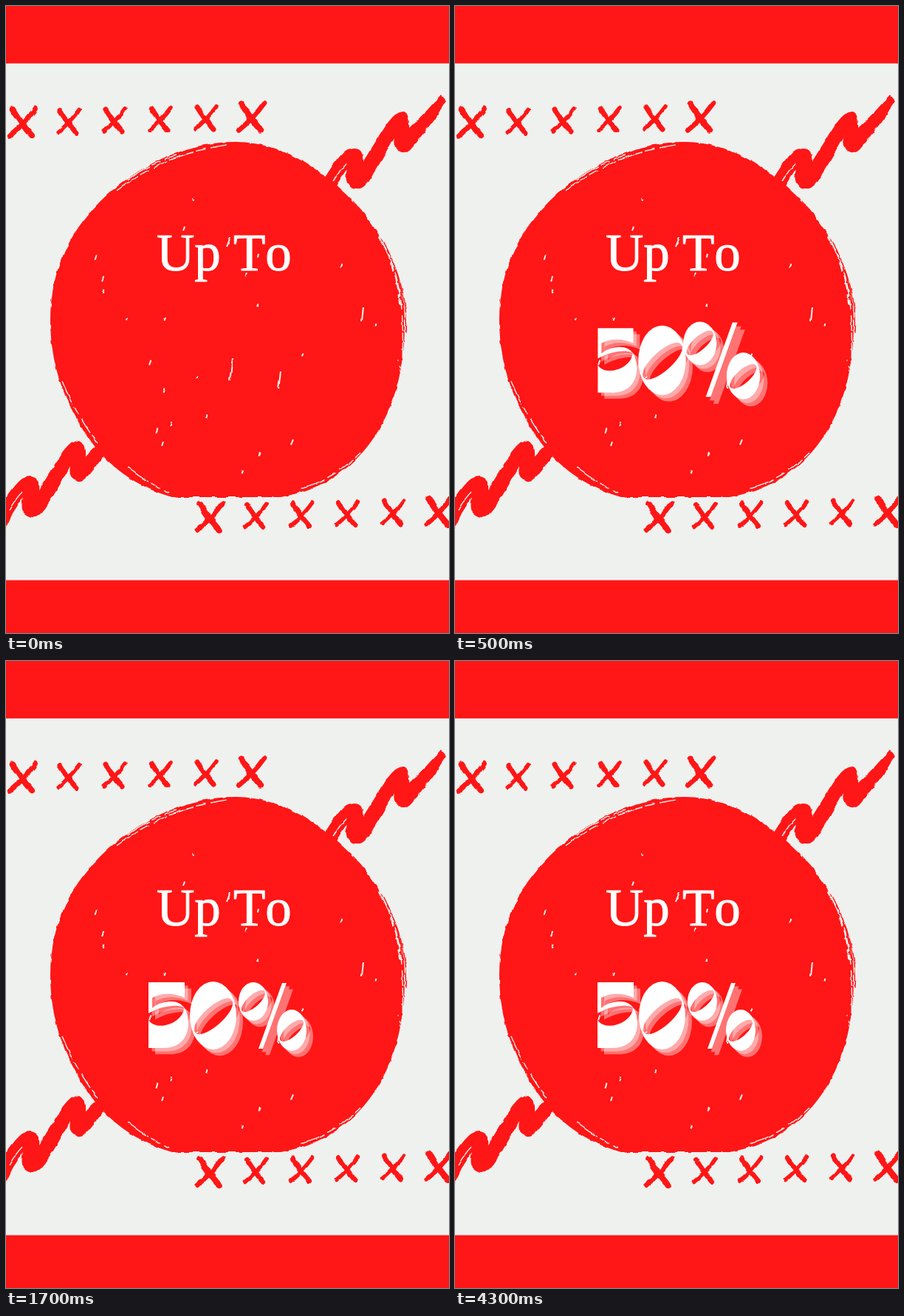
An HTML page that plays this animation: 600 px wide and 849 px high, repeating every 5 s.

```html
<!DOCTYPE html>
<html lang="en">
<head>
<meta charset="utf-8">
<title>Up To 50%</title>
<style>
  html, body { margin: 0; width: 100%; height: 100%; overflow: hidden; background: #eff1ef; }
  svg { display: block; width: 600px; height: 849px; }
  .red { fill: #ff1616; }
  .ink { fill: none; stroke: #ff1616; stroke-linecap: round; }
  .dry { fill: none; stroke: #eff1ef; stroke-width: 1.4; stroke-dasharray: 34 4 13 7 22 3; }
  .title { font: 71px "Liberation Serif", serif; font-kerning: none; stroke: #fff; stroke-width: 1; }
</style>
</head>
<body>
<svg viewBox="0 0 600 849">
  <defs>
    <filter id="rough" filterUnits="userSpaceOnUse" x="-20" y="60" width="640" height="740" color-interpolation-filters="sRGB">
      <feTurbulence type="fractalNoise" baseFrequency=".08" numOctaves="2" seed="4"/>
      <feDisplacementMap in="SourceGraphic" scale="4" xChannelSelector="R" yChannelSelector="G"/>
    </filter>

    <g id="zigzag">
      <path class="red" d="M416 256L432 232Q450 203 461 195Q474 188 482 197Q485 202 484 210
        Q504 178 517 158Q528 143 538 143Q547 147 546 165Q566 147 589 120L597 129
        Q583 152 551 190Q540 204 529 194Q524 190 526 178Q508 212 489 240
        Q479 253 465 243Q458 238 462 220Q455 231 448 242L430 280Z"/>
      <path class="dry" d="M443 238Q452 222 461 213"/>
    </g>
    <g id="cross" class="ink">
      <path stroke-width="7" d="M-11-15Q-2 0 11 15"/>
      <path stroke-width="5.5" d="M15-16Q2 2-14 15"/>
    </g>
    <g id="crosses"></g>

    <path id="five" d="M193 435H242V456C230 450 212 448 198 456V470C206 463 216 461 224 461
      C239 461 247 473 247 490C247 512 233 524 214 524H193V486
      C204 503 240 490 241 470C236 464 212 466 193 477Z"/>
    <path id="zero" fill-rule="evenodd" d="M249 480a31.5 46 0 1 1 63 0a31.5 46 0 1 1-63 0Z
      M256.5 503a33 12 -42 1 1 49-44a33 12 -42 1 1-49 44Z"/>
    <path id="percent" fill-rule="evenodd" d="M315 461a20 26 0 1 1 40 0a20 26 0 1 1-40 0Z
      M320 474a20 8 -42 1 1 30-27a20 8 -42 1 1-30 27Z
      M367 500a20 28 0 1 1 40 0a20 28 0 1 1-40 0Z
      M372 514a20 8 -42 1 1 30-27a20 8 -42 1 1-30 27Z
      M374 436H380L348 525H342Z"/>
  </defs>

  <rect width="600" height="849" fill="#eff1ef"/>
  <g filter="url(#rough)">
    <path class="red" d="M225 665C165 648 130 612 112 585C78 535 60 485 60 425C60 345 98 290 140 253
      C190 210 250 184 310 184C365 184 410 212 440 237C505 290 540 355 540 430
      C540 520 510 580 470 618C440 645 410 658 372 665Z"/>
    <path class="dry" d="M150 250Q215 200 300 188M165 235Q190 216 230 202
      M490 287Q535 345 537 430T531 480M505 312Q528 350 534 405
      M76 508Q93 550 124 592M165 625Q190 645 222 659M400 653Q445 640 480 605"/>
    <path class="ink" stroke-width="1.5" d="M512 320Q546 388 542 442"/>
    <use href="#zigzag"/>
    <use href="#zigzag" x="-439" y="445"/>
    <use href="#crosses"/>
    <use href="#crosses" x="253.5" y="534"/>
    <path id="flecks" class="dry" style="stroke-width:2;stroke-dasharray:none"
      d="M307 477L303 507M372 495L369 518M484 408L482 427M304 313L299 326M389 587L386 594"/>
  </g>
  <path class="red" d="M0 0H600V77.8H0ZM0 777.5H600V849H0Z"/>

  <g fill="#fff">
    <text class="title" y="358"><tspan x="204">Up</tspan><tspan x="308">To</tspan></text>
    <g id="price"></g>
  </g>
</svg>
<script>
const el = id => document.getElementById(id);

// Six crosses climbing slightly, the outer two larger
for (let i = 0; i < 6; i++) {
  const size = i % 5 ? 1 : 1.2;
  el('crosses').innerHTML +=
    `<use href="#cross" transform="translate(${22 + 62 * i} ${158 - 1.5 * i}) scale(${size})"/>`;
}

// Small bare spots scattered over the disc
let seed = 7;
const random = () => (seed = seed * 16807 % 2147483647) / 2147483647;
let spots = '';
for (let i = 0; i < 22; i++) {
  const angle = random() * 2 * Math.PI, r = 210 * Math.sqrt(random()), h = 2 + 5 * random();
  spots += `M${300 + r * Math.cos(angle)} ${430 + r * Math.sin(angle)}l${-h / 3} ${h}`;
}
el('flecks').setAttribute('d', el('flecks').getAttribute('d') + spots);

const glyphs = [['five', 216], ['zero', 280], ['percent', 360]].map(([id, x], i) => {
  el('price').insertAdjacentHTML('beforeend', `<g>
    <use href="#${id}" x="9" y="8.5" opacity=".4"/>
    <use href="#${id}" x="4.5" y="4.5" opacity=".4"/>
    <use href="#${id}"/></g>`);
  return { node: el('price').lastElementChild, x, start: 80 + 90 * i };
});

const spring = t => t <= 0 ? 0 : 1 - Math.exp(-.0085 * t) * Math.cos(t * Math.PI / 240);

function draw() {
  const t = Math.floor(performance.now() % 5000 / 100) * 100;
  for (const { node, x, start } of glyphs) {
    const s = spring(t - start);
    node.setAttribute('visibility', s > 0 ? 'visible' : 'hidden');
    node.setAttribute('transform', `translate(${x} 493) scale(${s}) translate(${-x} -493)`);
  }
  requestAnimationFrame(draw);
}
draw();
</script>
</body>
</html>
```
